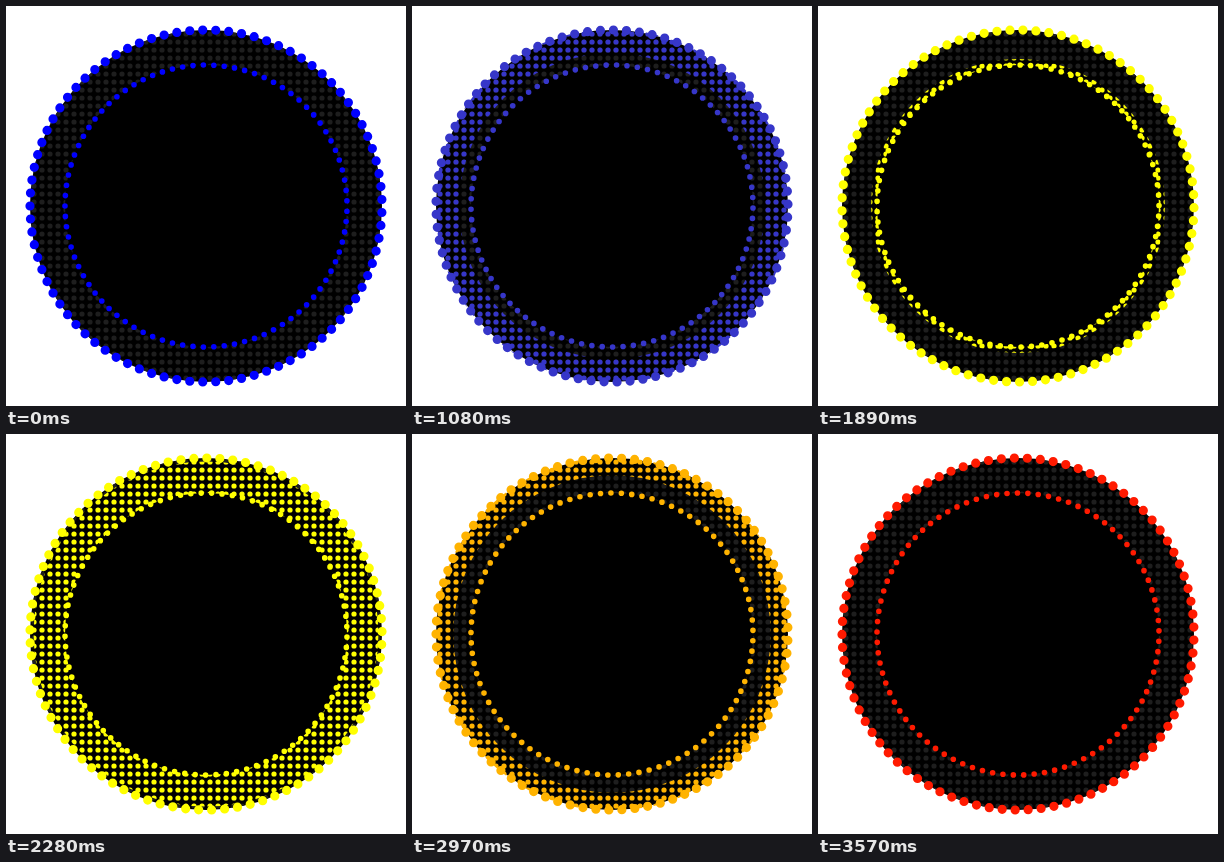
An HTML page with a canvas for the animation above (3.6 s loop, 400 by 400 pixels).

```html
<!DOCTYPE html>
<html>
<head>
<meta charset="utf-8">
<style>
html, body { margin: 0; width: 100%; height: 100%; overflow: hidden; background: #fff; }
canvas { display: block; }
</style>
</head>
<body>
<canvas id="stage" width="400" height="400"></canvas>
<script>
const ctx = document.getElementById('stage').getContext('2d');
const TAU = Math.PI * 2;
const LOOP = 3600, STEP = 30, CYCLE = 1800, HALF = CYCLE / 2;
const CENTER = 200, INNER = 141, OUTER = 176;
const BEADS = 85, PITCH = 8;
const PALETTE = [[0, 0, 255], [255, 255, 0], [255, 0, 0]];

function circle(x, y, r) {
  ctx.moveTo(x + r, y);
  ctx.arc(x, y, r, 0, TAU);
}

function disc(r, color) {
  ctx.beginPath();
  circle(CENTER, CENTER, r);
  ctx.fillStyle = color;
  ctx.fill();
}

// Grid dots visible only between two radii.
function grid(from, to, color) {
  if (to <= from) return;
  ctx.save();
  ctx.beginPath();
  circle(CENTER, CENTER, to);
  circle(CENTER, CENTER, from);
  ctx.clip('evenodd');
  ctx.beginPath();
  for (let y = PITCH / 2; y < 400; y += PITCH) {
    for (let x = PITCH / 2; x < 400; x += PITCH) {
      const d = Math.hypot(x - CENTER, y - CENTER);
      if (d > INNER - 4 && d < OUTER + 4) circle(x, y, 2.6);
    }
  }
  ctx.fillStyle = color;
  ctx.fill();
  ctx.restore();
}

function beads(radius, size, turn, color) {
  ctx.beginPath();
  for (let i = 0; i < BEADS; i++) {
    const a = Math.PI + (i + turn) / BEADS * TAU;
    circle(CENTER + radius * Math.cos(a), CENTER + radius * Math.sin(a), size);
  }
  ctx.fillStyle = color;
  ctx.fill();
}

function colorAt(t) {
  const index = Math.floor(t / CYCLE);
  const mix = Math.min(1, Math.max(0, (t % CYCLE - 870) / 1000));
  const next = PALETTE[index + 1];
  return `rgb(${PALETTE[index].map((c, i) => Math.round(c + (next[i] - c) * mix))})`;
}

function draw(t) {
  const color = colorAt(t);
  const local = t % CYCLE;
  const wave = INNER + (local % HALF) / HALF * 59;
  const edge = OUTER + 1;

  ctx.fillStyle = '#fff';
  ctx.fillRect(0, 0, 400, 400);
  disc(OUTER, '#000');
  grid(INNER, OUTER, '#1e1e1e');
  if (local < HALF) grid(INNER, Math.min(wave, edge), color);
  else grid(wave, edge, color);

  const frames = t / STEP;
  beads(OUTER, 4.6, -0.1011 * frames, color);
  beads(INNER, 2.8, 0.1025 * frames, color);
}

function tick() {
  const t = performance.now() % LOOP;
  draw(Math.floor(t / STEP) * STEP);
  requestAnimationFrame(tick);
}
tick();
</script>
</body>
</html>
```
